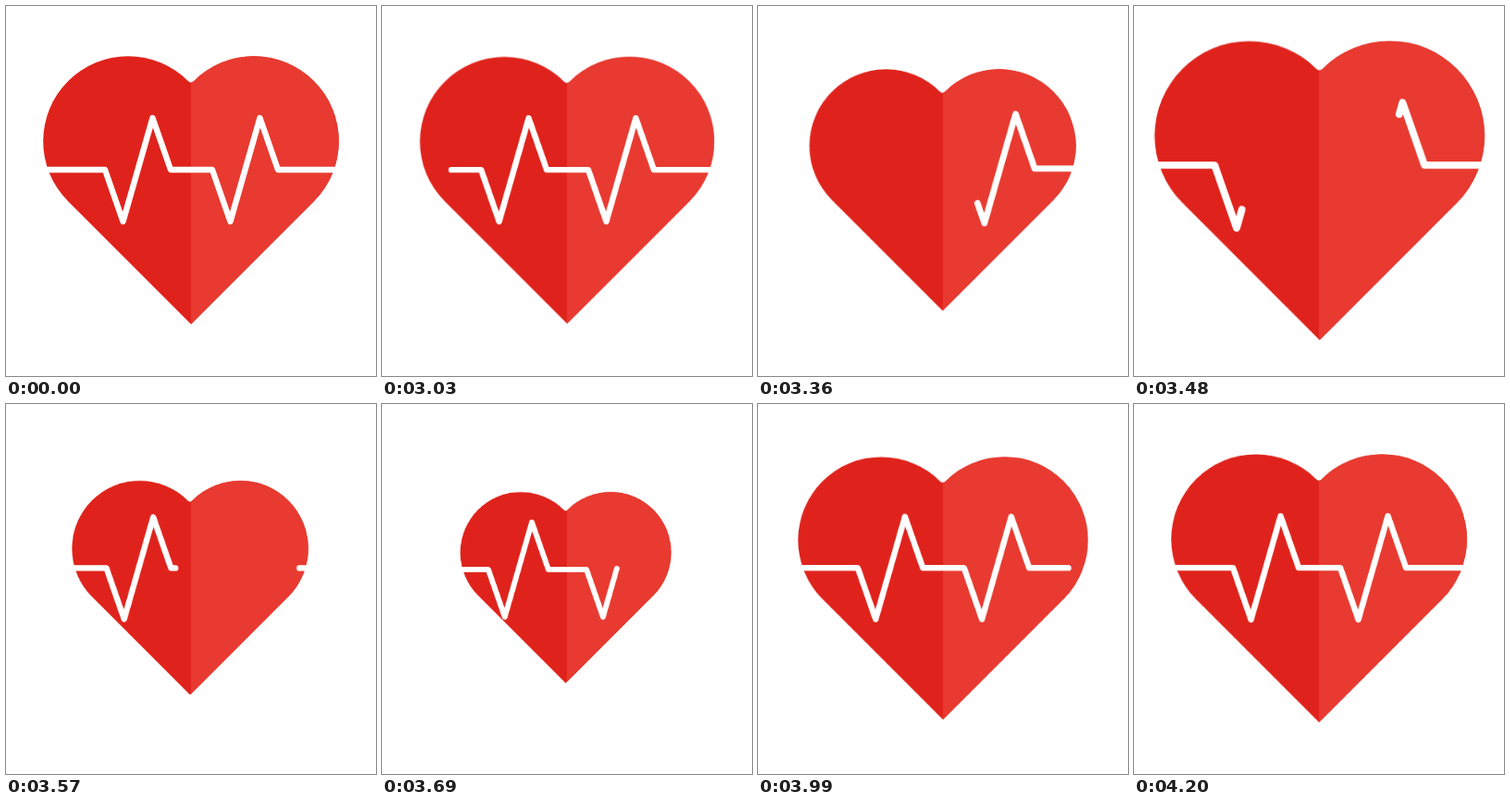
Recreate the animation shown at these times as an HTML page. Size 400x400 px, loop 4.23 s.

```html
<!DOCTYPE html>
<html lang="en">
<head>
<meta charset="utf-8">
<title>Heartbeat</title>
<style>
  html, body { margin: 0; height: 100%; overflow: hidden; background: #fff; }
  svg { display: block; width: 100vw; height: 100vh; }

  .heart, .pulse, .trace { animation: 4230ms linear infinite; }
  .heart { transform-origin: 195px 196.5px; animation-name: beat; }
  .pulse { transform-origin: 200px 200px; animation-name: swell; }
  .trace {
    fill: none;
    stroke: #fff;
    stroke-width: 6.4;
    stroke-linecap: round;
    stroke-linejoin: round;
    stroke-dasharray: 644 700;
  }
  .out { animation-name: erase; }
  .in { animation-name: draw; }

  @keyframes beat {
    0% { transform: scale(1); }
    70.922% { transform: scale(1); animation-timing-function: cubic-bezier(.5, 0, .5, 1); }
    77.66% { transform: scale(.717); animation-timing-function: cubic-bezier(.42, 0, .58, 1); }
    81.56% { transform: scale(1.142); animation-timing-function: cubic-bezier(.42, 0, .58, 1); }
    85.816% { transform: scale(.7); animation-timing-function: cubic-bezier(.36, 0, .04, 1); }
    99.291%, 100% { transform: scale(1); }
  }
  @keyframes swell {
    0% { transform: scale(1); }
    70.922% { transform: scale(1); animation-timing-function: cubic-bezier(.5, 0, .5, 1); }
    77.66% { transform: scale(.918); animation-timing-function: cubic-bezier(.42, 0, .58, 1); }
    81.56% { transform: scale(1.232); animation-timing-function: cubic-bezier(.42, 0, .58, 1); }
    85.816% { transform: scale(.912); animation-timing-function: cubic-bezier(.36, 0, .24, 1); }
    99.291%, 100% { transform: scale(1); }
  }
  @keyframes erase {
    0%, 70.922% { stroke-dashoffset: 0; }
    85.284%, 100% { stroke-dashoffset: -644; }
  }
  @keyframes draw {
    0% { stroke-dashoffset: 644; }
    78.014% { stroke-dashoffset: 644; animation-timing-function: cubic-bezier(.31, 0, .19, 1); }
    99.291%, 100% { stroke-dashoffset: 0; }
  }
</style>
</head>
<body>
<svg viewBox="0 0 400 400">
  <defs>
    <path id="heart" d="M200 344L67 211A91.8 91.8 0 0 1 197 81.3Q200 84 203 81.3A91.8 91.8 0 0 1 333 211Z"/>
    <path id="trace" d="M42 177H107L126.5 233L158.5 121L178 177H223L242.5 233L274.5 121L294 177H358"/>
    <clipPath id="right"><rect x="200" width="200" height="400"/></clipPath>
  </defs>
  <g class="heart"><use href="#heart" fill="#df231c"/></g>
  <g clip-path="url(#right)">
    <g class="heart"><use href="#heart" fill="#e83a30"/></g>
  </g>
  <g class="pulse">
    <use class="trace out" href="#trace"/>
    <use class="trace in" href="#trace"/>
  </g>
</svg>
</body>
</html>
```
